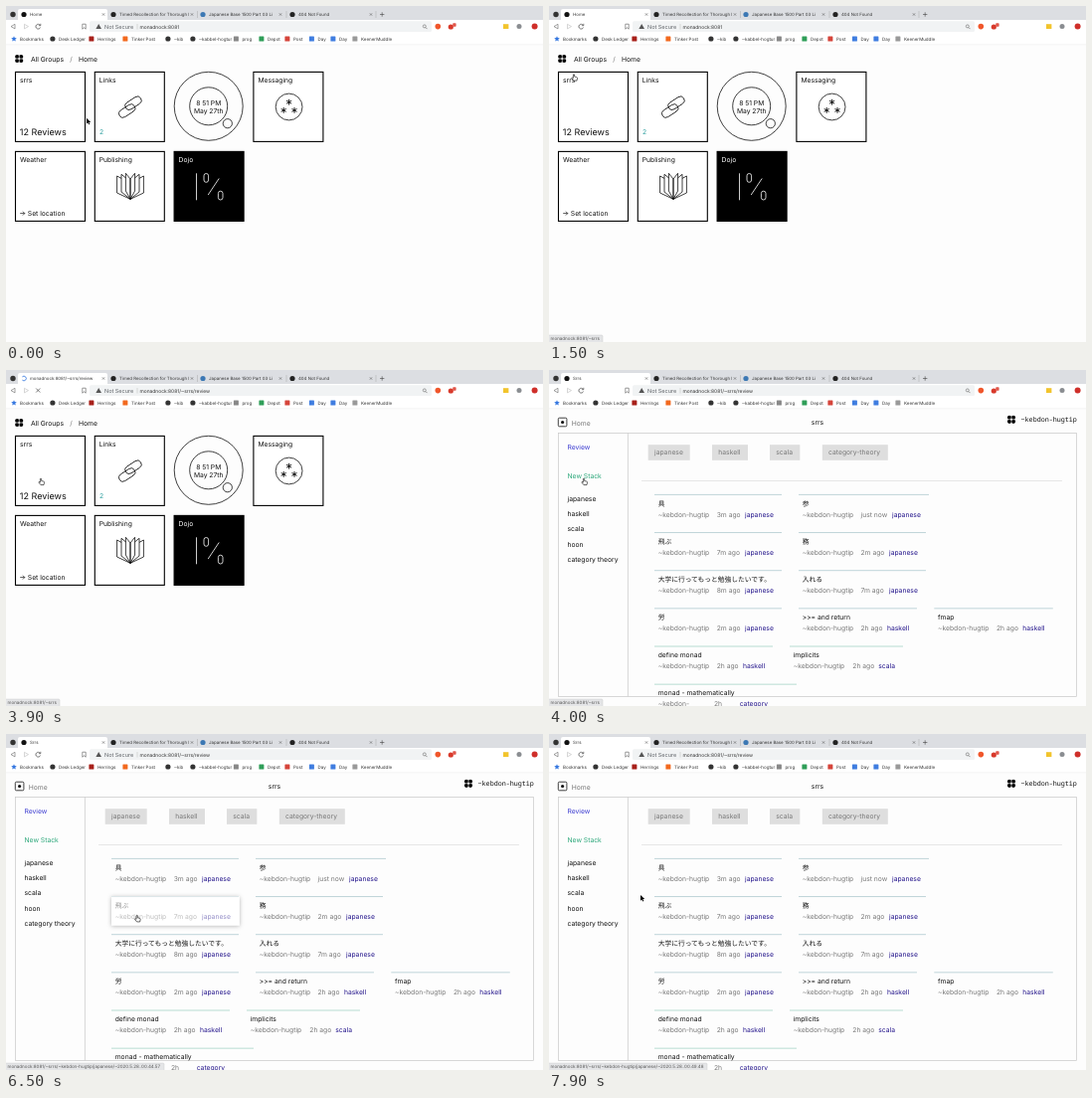
Recreate the animation shown at these times as an HTML page. Size 540 px wide and 338 px high, loop 8000 ms.

```html
<!DOCTYPE html>
<html lang="en">
<head>
<meta charset="utf-8">
<title>Home</title>
<style>
  html, body { margin: 0; width: 100%; height: 100%; overflow: hidden; background: #fdfdfd; }
  svg { display: block; width: 100vw; height: 100vh; }
  text { font-family: Inter, "Noto Sans CJK JP", "Noto Sans CJK", sans-serif; text-rendering: geometricPrecision; white-space: pre; }
  .mono { font-family: "Noto Sans Mono", "DejaVu Sans Mono", monospace; }
  .line { fill: none; stroke: #000; stroke-width: .75; }
</style>
</head>
<body>
<svg id="stage" viewBox="0 0 540 338" preserveAspectRatio="none"></svg>
<script>
const LOOP = 8000, STEP = 100;
const USER = '~kebdon-hugtip', HOST = 'monadnock:8081', APP = HOST + '/~srrs';
const INK = '#111', GREY = '#777', LINK = '#21128a', GREEN = '#2aa779';

// Markup helpers
const text = (x, y, s, fill = INK, size = 6.75, more = '') =>
  `<text x="${x}" y="${y}" fill="${fill}" font-size="${size}" ${more}>${s.replace(/>/g, '&gt;')}</text>`;
const rect = (x, y, w, h, fill, more = '') =>
  `<rect x="${x}" y="${y}" width="${w}" height="${h}" fill="${fill}" ${more}/>`;
const disc = (x, y, r, fill, more = '') => `<circle cx="${x}" cy="${y}" r="${r}" fill="${fill}" ${more}/>`;
const path = (d, stroke = '#000', width = .75, fill = 'none', more = '') =>
  `<path d="${d}" stroke="${stroke}" stroke-width="${width}" fill="${fill}" ${more}/>`;
const ring = (x, y, r) => `<circle class="line" cx="${x}" cy="${y}" r="${r}"/>`;
const group = (id, body, more = '') => `<g id="${id}" ${more}>${body}</g>`;

const sigil = (x, y) => [[-1, -1], [1, -1], [-1, 1], [1, 1]]
  .map(([a, b]) => disc(x + a * 2, y + b * 2, 2.1, '#000')).join('') +
  path(`M${x - 3} ${y}H${x + 3}M${x} ${y - 3}V${y + 3}`, '#fdfdfd', .5);

function tabs() {
  const close = x => path(`M${x - 1.2} 7.3l2.4 2.4m0-2.4l-2.4 2.4`, '#555', .55);
  const tab = (x, title, color, id = '') =>
    disc(x, 8.5, 2.6, color, id && `id="${id}Icon"`) +
    `<svg x="${x + 6}" y="2" width="74" height="13" overflow="hidden">` +
    text(0, 8.2, title, '#333', 4.4, id && `id="${id}"`) + '</svg>';
  return rect(0, 0, 540, 15, '#dcdee2') +
    path('M12 15V5q0-2 2-2H100q2 0 2 2V15z', 'none', 0, '#fff') +
    disc(7, 8.5, 2.7, '#333') +
    tab(18, 'Home', '#111', 'tabTitle') + tab(108, 'Timed Recollection for Thorough L', '#222') +
    tab(198, 'Japanese Base 1500 Part 03 Li', '#3c78b4') + tab(288, '404 Not Found', '#222') +
    rect(184, 3, 6, 11, '#dcdee2') + rect(272, 3, 7, 11, '#dcdee2') +
    [98, 187, 276, 367].map(close).join('') +
    path('M192.5 5v7M282 5v7M372 5v7', '#aaa', .5) +
    path('M376 8.5h4.4M378.2 6.3v4.4', '#444', .6) +
    path('M18 6.2a2.3 2.3 0 1 1 -2.3 2.3', '#3b7de0', .8, 'none', 'id="spinner"');
}

function toolbar() {
  return rect(0, 14, 540, 25, '#fff') +
    rect(84, 15.3, 344, 10.8, '#f1f3f4', 'rx="1.5"') +
    path('M9 18.3v4.6l-4-2.3z', '#666', .6) + path('M18.5 18.3v4.6l4-2.3z', '#bbb', .6) +
    path('M34.3 19.3a2.4 2.4 0 1 0 .3 2.2M34.8 17.8v1.9h-1.9', '#444', .7, 'none', 'id="reload"') +
    path('M30.2 18.5l4 4m0-4l-4 4', '#444', .7, 'none', 'id="stop"') +
    path('M76.8 18.2h3.4v5l-1.7-1.4-1.7 1.4z', '#555', .6) +
    path('M93.2 18l2.8 5h-5.6z', 'none', 0, '#555') +
    text(99, 22.5, 'Not Secure', '#5f6368', 5.5) +
    path('M132 18v5.5', '#bbb', .5) +
    text(134.5, 22.5, HOST, '#333', 4.9, 'id="address"') +
    ring(420.8, 20.4, 1.5).replace('class="line"', 'fill="none" stroke="#666" stroke-width=".6"') +
    path('M422 21.6l1.5 1.5', '#666', .7) +
    disc(434.3, 20.6, 2.8, '#f0562b') + disc(447.3, 21, 2.6, '#d8392b') +
    rect(449.2, 17.2, 3.4, 3.6, '#e0564a', 'rx=".7"') +
    rect(500, 18.2, 5.4, 4.8, '#f2c42c') + disc(516, 20.6, 2.5, '#8a8d91') + disc(531.6, 20.6, 3, '#cf2f2a');
}

function bookmarks() {
  const items = [
    [14, 'Bookmarks', ''], [53, 'Desk Ledger', '#333'], [92, 'Herrings', '#a8201a', 1],
    [126, 'Tinker Post', '#f2691e', 1], [169, '~kib', '#333'], [194, '~kabbel-hogtur', '#333'],
    [237.5, 'prog', '#888', 1], [263, 'Depot', '#2f9e58', 1], [289, 'Post', '#d5443a', 1],
    [313.5, 'Day', '#3f7de0', 1], [335, 'Day', '#3f7de0', 1], [357, 'KeenerMuddle', '#999', 1]
  ];
  return path('M8 30.2l.8 1.8 2 .2-1.5 1.3.5 2-1.8-1-1.8 1 .5-2-1.5-1.3 2-.2z', 'none', 0, '#3577e0') +
    items.map(([x, name, color, square]) =>
      (!color ? '' : square ? rect(x - 8.6, 30.4, 5, 5, color, 'rx=".5"') : disc(x - 6.1, 33, 2.6, color)) +
      text(x, 34.7, name, '#333', 4.5)).join('') +
    path('M0 38.8H540', '#e2e2e2', .4);
}

function homePage() {
  const tile = (col, row, name, fill = '#fff') =>
    rect(9.5 + col * 79.8, 66.4 + row * 80, 70, 70, fill, 'stroke="#000" stroke-width="1.1"') +
    text(14 + col * 79.8, 76.7 + row * 80, name, fill === '#fff' ? INK : '#fff');
  const star = (x, y) => path([0, 60, 120].map(a => {
    const r = a * Math.PI / 180, c = 2.9 * Math.sin(r), s = 2.9 * Math.cos(r);
    return `M${x - c} ${y - s}L${x + c} ${y + s}`;
  }).join(''), '#000', .9);
  const link = (x, y) => `<rect class="line" x="${x - 9}" y="${y - 4}" width="18" height="8" rx="4" transform="rotate(-33 ${x} ${y})"/>`;
  const leaves = path('M125 194.3L111.6 188V171l4.4 2.4M125 194.3L116 187V169.3l4.4 3.6M125 194.3L120.4 186V168.3L125 174V194.3');
  const zero = (x, y) => rect(x - 2.3, y - 4.4, 4.6, 8.8, 'none', 'rx="2.3" stroke="#fff" stroke-width=".8"');
  return sigil(13.2, 53) + text(25, 55.6, 'All Groups') + text(64.3, 55.6, '/', GREY) + text(73, 55.6, 'Home') +
    tile(0, 0, 'srrs') + text(13.8, 129.8, '12 Reviews', INK, 9) +
    tile(1, 0, 'Links') + link(128, 97.7) + link(121.7, 105.5) + text(94, 129.2, '2', '#2a9d9d') +
    ring(203.7, 100.8, 34.5) + ring(203.7, 100.8, 19) + disc(222.8, 118.2, 4.6, '#fdfdfd') + ring(222.8, 118.2, 4.6) +
    text(203.7, 100.2, '8 51 PM', INK, 6.75, 'text-anchor="middle"') +
    text(203.7, 108.2, 'May 27th', INK, 6.75, 'text-anchor="middle"') +
    tile(3, 0, 'Messaging') + ring(284.6, 101.5, 13.4) + star(284.6, 96.7) + star(279.2, 104.9) + star(290, 104.9) +
    tile(0, 1, 'Weather') + path('M14.2 208.6h4.6m-1.9-1.9l1.9 1.9-1.9 1.9', INK, .7) + text(21.8, 210.9, 'Set location') +
    tile(1, 1, 'Publishing') + leaves + `<g transform="matrix(-1 0 0 1 250 0)">${leaves}</g>` +
    tile(2, 1, 'Dojo', '#000') + path('M191.5 168.3v27M203.2 190l11-16.5', '#fff', .8) + zero(201.3, 172.9) + zero(215.7, 190.6);
}

// left, row, width, title, age, stack, gap before age, gap before stack
const CARDS = [
  [106, 0, 128, '具', '3m ago', 'japanese', 62.7, 91],
  [106, 1, 128, '飛ぶ', '7m ago', 'japanese', 62.7, 91],
  [106, 2, 128, '大学に行ってもっと勉強したいです。', '8m ago', 'japanese', 62.7, 91],
  [106, 3, 128, '労', '2m ago', 'japanese', 62.7, 91],
  [251, 0, 131, '参', 'just now', 'japanese', 62.5, 94],
  [251, 1, 128, '務', '2m ago', 'japanese', 62.5, 91],
  [251, 2, 128, '入れる', '7m ago', 'japanese', 62.5, 91],
  [251, 3, 119, '>>= and return', '2h ago', 'haskell', 62.5, 89],
  [387.3, 3, 119.5, 'fmap', '2h ago', 'haskell', 62.7, 89],
  [106, 4, 119, 'define monad', '2h ago', 'haskell', 62.7, 89],
  [242, 4, 114, 'implicits', '2h ago', 'scala', 63.3, 89.3],
  [106, 5, 143, 'monad - mathematically', '2h', 'category', 60, 85.7]
];

function card([x, row, w, title, age, stack, ageX, stackX], i) {
  const y = 125.4 + row * 38.15;
  const who = row === 5 ? USER.split('-')[0] + '-' : USER;
  return rect(x, y, w + .8, 29, '#fff', `id="shade${i}" filter="url(#shadow)" opacity="0"`) +
    group('card' + i,
      path(`M${x} ${y}h${w}`, row > 3 ? '#a5d3c6' : '#b0cbd0', .8) +
      text(x + 3.7, y + 11.1, title, INK, 6.75, 'lang="ja"') +
      text(x + 3.7, y + 22.2, who, GREY) + text(x + ageX, y + 22.2, age, GREY) +
      text(x + stackX, y + 22.2, stack, LINK));
}

function reviewPage() {
  const tags = [[99.7, 42, 'japanese'], [164, 36, 'haskell'], [222, 30.3, 'scala'], [274.8, 66, 'category-theory']];
  const stacks = ['japanese', 'haskell', 'scala', 'hoon', 'category theory'];
  return rect(9.3, 48.2, 8.6, 8.6, 'none', 'rx="1.2" stroke="#111" stroke-width=".8"') + disc(13.6, 52.5, 1.6, '#111') +
    text(22.8, 55.8, 'Home', GREY) + text(270, 54.8, 'srrs', INK, 6.75, 'text-anchor="middle"') +
    sigil(465, 49.8) + text(474.6, 52.2, USER, INK, 6.7, 'class="mono"') +
    rect(9.4, 63.4, 521.2, 265, 'none', 'stroke="#c8c8c8" stroke-width=".7"') +
    path('M79.4 63.4v265', '#c8c8c8', .7) + path('M93 111.5H516', '#dedede', .7) +
    text(18.5, 80.4, 'Review', '#3a3ad0') + text(18.5, 109.3, 'New Stack', GREEN) +
    stacks.map((s, i) => text(18.5, 131.5 + i * 15.4, s)).join('') +
    tags.map(([x, w, s]) => rect(x, 75.2, w, 15.6, '#dedede') + text(x + 6.3, 85.4, s, GREY)).join('') +
    CARDS.map(card).join('');
}

const stage = document.getElementById('stage');
stage.innerHTML =
  '<defs><filter id="shadow" x="-20%" y="-50%" width="140%" height="200%">' +
  '<feDropShadow dx="0" dy=".6" stdDeviation="2.2" flood-color="#000" flood-opacity=".3"/></filter></defs>' +
  rect(0, 0, 540, 338, '#fdfdfd') + group('home', homePage()) + group('review', reviewPage()) +
  tabs() + toolbar() + bookmarks() +
  group('status', rect(-2, 331, 56, 9, '#e4e5e7', 'id="bubble" rx="1.2" stroke="#c4c4c4" stroke-width=".4"') +
    text(1.5, 336.1, APP, '#555', 4.5, 'id="hint"')) +
  group('arrow', path('M0 0v5.7l1.4-1.2.9 2 1-.4-.9-2h1.8z', '#fff', .5, '#000', 'paint-order="stroke"')) +
  group('hand', path('M-.6 .4q.6-.8 1.2 0v2.1l2.1.5q.9.3.8 1.2l-.5 2.4h-3.1l-2.1-2.6q.1-.8 1-.4l.6.5z', '#000', .6, '#fff'));

const ids = {};
stage.querySelectorAll('[id]').forEach(e => ids[e.id] = e);
const show = (id, on) => ids[id].style.display = on ? '' : 'none';
const clamp = v => Math.max(0, Math.min(1, v));

// time, x, y of the pointer
const MOVES = [
  [300, 81, 112.8], [600, 80.5, 82], [800, 66, 61], [1100, 29, 61], [1300, 25, 68.5],
  [1700, 25, 68.5], [2200, 35, 109], [4700, 35, 109], [5100, 137.5, 142.5],
  [6100, 137.5, 142.5], [6400, 133, 172], [6700, 129, 203], [7000, 127, 222],
  [7100, 127, 222], [7200, 125, 237], [7300, 121, 247], [7500, 109, 244], [7900, 92, 162]
];

// start, end, card, timestamp in its address
const HOVERS = [
  [5000, 6300, 0, '00.48.39'], [6300, 6600, 1, '00.44.57'],
  [6700, 7200, 2, '00.44.16'], [7300, 7600, 3, '00.49.48']
];

function pointer(t) {
  const n = MOVES.findIndex(m => m[0] > t);
  if (n === 0) return MOVES[0].slice(1);
  if (n < 0) return MOVES[MOVES.length - 1].slice(1);
  const a = MOVES[n - 1], b = MOVES[n], k = (t - a[0]) / (b[0] - a[0]);
  return [a[1] + (b[1] - a[1]) * k, a[2] + (b[2] - a[2]) * k];
}

function draw(t) {
  const loading = t >= 3400 && t < 4000, opened = t >= 4000;
  show('home', !opened);
  show('review', opened);
  show('reload', !loading);
  show('stop', loading);
  show('spinner', loading);
  show('tabTitleIcon', !loading);
  ids.spinner.setAttribute('transform', `rotate(${t * .45} 18 8.5)`);
  ids.tabTitle.textContent = opened ? 'Srrs' : loading ? APP + '/review' : 'Home';
  ids.address.textContent = t >= 3400 ? APP + '/review' : HOST;

  for (const [from, to, i] of HOVERS) {
    const level = Math.min(clamp((t - from) / 150), 1 - clamp((t - to) / 150));
    ids['shade' + i].setAttribute('opacity', level);
    ids['card' + i].setAttribute('opacity', 1 - level * .52);
  }

  const last = HOVERS.filter(h => h[0] <= t).pop();
  const deep = t >= 6300;
  show('status', t >= 1300 && t < 4200 || deep);
  ids.hint.textContent = deep ? `${APP}/${USER}/japanese/~2020.5.28..${last[3]}` : APP;
  ids.bubble.setAttribute('width', deep ? 161 : 56);

  const hand = t >= 1200 && t < 4800 || HOVERS.some(h => t >= h[0] && t < h[1]);
  show('hand', hand);
  show('arrow', !hand);
  ids[hand ? 'hand' : 'arrow'].setAttribute('transform', `translate(${pointer(t)})`);
}

const start = performance.now();
function tick() {
  const t = (performance.now() - start) % LOOP;
  draw(Math.floor(t / STEP) * STEP);
  requestAnimationFrame(tick);
}
tick();
</script>
</body>
</html>
```
